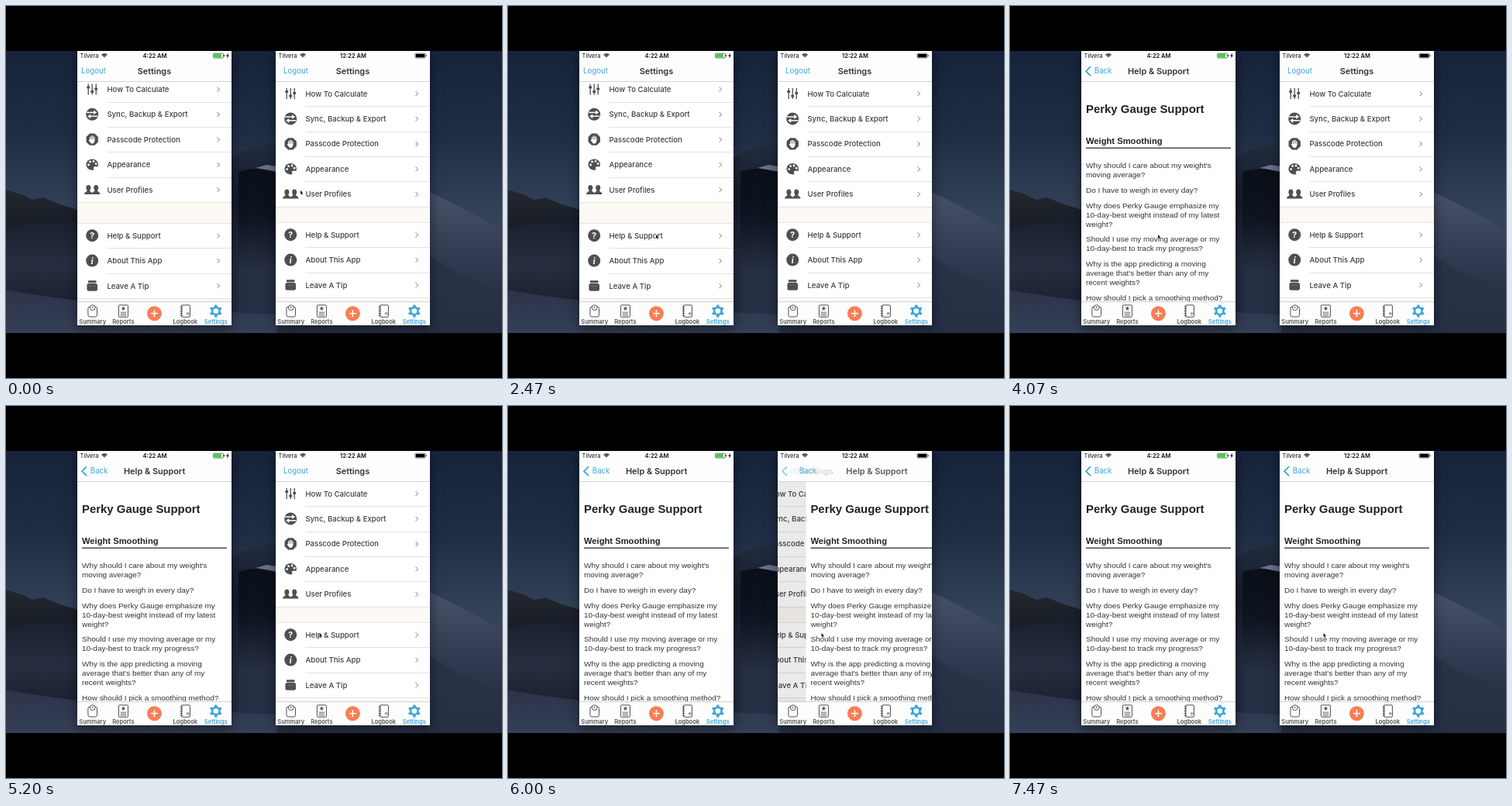
These frames come from a looping animation (640 by 480 pixels, 8 s). An HTML page with a canvas:

```html
<!DOCTYPE html>
<html lang="en">
<head>
<meta charset="utf-8">
<title>Settings navigation</title>
<style>
html, body { margin: 0; width: 100%; height: 100%; overflow: hidden; background: #000; }
canvas { display: block; }
</style>
</head>
<body>
<canvas id="stage" width="640" height="480"></canvas>
<script>
const c = document.getElementById('stage').getContext('2d');
const LOOP = 8000, W = 199, H = 354, NAV = 39.6, TAB = 323.3, ROW = 32.4;
const UI = 'Inter, sans-serif', WEB = '"Liberation Sans", Arial, sans-serif';
const BLUE = '#3fa5d8', INK = '#3c3c3c', ICON = '#4f4f4f';

const ROWS = ['How To Calculate', 'Sync, Backup & Export', 'Passcode Protection', 'Appearance',
  'User Profiles', 'Help & Support', 'About This App', 'Leave A Tip'];
const QUESTIONS = [
  ["Why should I care about my weight's", 'moving average?'],
  ['Do I have to weigh in every day?'],
  ['Why does Perky Gauge emphasize my', '10-day-best weight instead of my latest', 'weight?'],
  ['Should I use my moving average or my', '10-day-best to track my progress?'],
  ['Why is the app predicting a moving', "average that's better than any of my", 'recent weights?'],
  ['How should I pick a smoothing method?']
];
const PHONES = [
  { x: 92, time: '4:22 AM', logout: 5, first: 49.4, second: 222, push: 2676, load: 4070, charging: true },
  { x: 348, time: '12:22 AM', logout: 10, first: 55, second: 221, push: 5804, load: 0 }
];

// ---- helpers ----
function text(s, x, y, font, color = INK, align = 'left') {
  c.font = font;
  c.fillStyle = color;
  c.textAlign = align;
  c.fillText(s, x, y);
}
function rect(x, y, w, h, color) {
  c.fillStyle = color;
  c.fillRect(x, y, w, h);
}
function path(points, close) {
  c.beginPath();
  for (let i = 0; i < points.length; i += 2) c.lineTo(points[i], points[i + 1]);
  if (close) c.closePath();
}
function line(points, color, width = 1) {
  path(points);
  c.strokeStyle = color;
  c.lineWidth = width;
  c.stroke();
}
function poly(points, color) {
  path(points, true);
  c.fillStyle = color;
  c.fill();
}
function disc(x, y, r, color, ry = r) {
  c.beginPath();
  c.ellipse(x, y, r, ry, 0, 0, 7);
  c.fillStyle = color;
  c.fill();
}
function box(x, y, w, h, r, fill, stroke, width = 1) {
  c.beginPath();
  c.roundRect(x, y, w, h, r);
  if (fill) { c.fillStyle = fill; c.fill(); }
  if (stroke) { c.strokeStyle = stroke; c.lineWidth = width; c.stroke(); }
}
function at(x, y, draw) {
  c.save();
  c.translate(x, y);
  draw();
  c.restore();
}
function faded(alpha, draw) {
  c.save();
  c.globalAlpha *= alpha;
  draw();
  c.restore();
}
function shade(y0, y1, ...colors) {
  const g = c.createLinearGradient(0, y0, 0, y1);
  colors.forEach((col, i) => g.addColorStop(i / (colors.length - 1), col));
  return g;
}
function ring(n, r, turn = 0) {
  const p = [];
  for (let i = 0; i < n; i++) {
    const a = turn + i * 2 * Math.PI / n;
    p.push(r(i) * Math.cos(a), r(i) * Math.sin(a));
  }
  return p;
}

// ---- row icons, centred on 0,0 ----
function person(x) {
  disc(x, -2.4, 3, ICON, 3.7);
  c.beginPath();
  c.moveTo(x - 5.3, 6);
  c.bezierCurveTo(x - 5.3, 2.6, x - 1.6, 3.4, x - 1.5, 0);
  c.lineTo(x + 1.5, 0);
  c.bezierCurveTo(x + 1.6, 3.4, x + 5.3, 2.6, x + 5.3, 6);
  c.fill();
}
const ROW_ICONS = [
  () => [[-5, -2.5], [0, 3], [5, -0.5]].forEach(([x, y]) => {
    line([x, -7, x, 7], ICON, 1.3);
    box(x - 2, y - 1.5, 4, 3, 1, ICON);
  }),
  () => {
    disc(0, 0, 8, ICON);
    for (const s of [1, -1]) {
      line([-7 * s, -2.4 * s, 3 * s, -2.4 * s], '#fff', 1.5);
      poly([2 * s, -5.4 * s, 6 * s, -2.4 * s, 2 * s, 0.3 * s], '#fff');
    }
  },
  () => {
    poly(ring(8, () => 8.3, Math.PI / 8), ICON);
    [[-2.6, -3.2], [-0.9, -4.8], [0.9, -4.8], [2.6, -3.4]].forEach(([x, y]) =>
      line([x, y, x, 2], '#fff', 1.2));
    poly([-3.2, 0, 3.2, 0, 2.5, 4, 1, 5.3, -1.2, 5.3, -4.6, 1, -3.8, 0.4], '#fff');
  },
  () => {
    disc(0, 0, 7.8, ICON, 7.2);
    disc(4.6, 4.8, 3, '#fff', 2.4);
    [[-4.6, 0.4], [-2.6, -3.6], [1.8, -4.2], [4.9, -1]].forEach(([x, y]) => disc(x, y, 1.4, '#fff'));
  },
  () => { person(-4.8); person(5); },
  () => { disc(0, 0, 8, ICON); text('?', 0, 4, '700 11px ' + UI, '#fff', 'center'); },
  () => { disc(0, 0, 8, ICON); text('i', 0, 4, 'italic 700 12px "Liberation Serif", serif', '#fff', 'center'); },
  () => {
    box(-5.3, -6.8, 10.6, 3, 1, ICON);
    box(-6.8, -3, 13.6, 9.8, 2.5, ICON);
    line([-4.5, 0.2, 4.5, 0.2], '#777', 0.8);
  }
];

// ---- tab icons, centred on 0,0 ----
function gear() {
  c.beginPath();
  c.arc(0, 0, 4.7, 0, 7);
  c.strokeStyle = BLUE;
  c.lineWidth = 2.6;
  c.stroke();
  const tips = ring(6, () => 8, Math.PI / 6);
  for (let i = 0; i < 12; i += 2) line([tips[i] * 0.65, tips[i + 1] * 0.65, tips[i], tips[i + 1]], BLUE, 3.4);
}
const TABS = [
  [19.7, 'Summary', () => {
    box(-5.8, -5.6, 11.6, 13, 2.2, null, ICON, 1);
    disc(0, -4.4, 3.6, '#fff');
    c.beginPath();
    c.arc(0, -4.4, 3.4, 0, 7);
    c.stroke();
    line([0, -6, 0, -3.4], ICON, 1);
  }],
  [59.4, 'Reports', () => {
    box(-6, -7.7, 12, 15.4, 0.8, null, ICON, 1);
    poly(ring(10, i => i % 2 ? 1.3 : 3, -Math.PI / 2).map((v, i) => i % 2 ? v - 3.2 : v), ICON);
    for (const y of [1.6, 3.6, 5.6]) line([-3.8, y, 3.8, y], ICON, 0.8);
  }],
  [139.2, 'Logbook', () => {
    box(-4.8, -7.7, 11, 15.4, 1.2, null, ICON, 1);
    for (let y = -5.6; y < 7; y += 2.8) line([-6.5, y, -3.2, y], ICON, 1);
    box(2.2, 2.2, 2.4, 2.2, 0.5, null, ICON, 0.8);
  }],
  [178.8, 'Settings', gear]
];

// ---- scenery ----
// area under a curve from (x0,y0) to (x1,y1), bent towards (cx,cy)
function dune(x0, y0, cx, cy, x1, y1, color) {
  c.beginPath();
  c.moveTo(x0, y0);
  c.quadraticCurveTo(cx, cy, x1, y1);
  c.lineTo(x1, 422);
  c.lineTo(x0, 422);
  c.fillStyle = color;
  c.fill();
}
function landscape() {
  rect(0, 0, 640, 480, '#000');
  c.save();
  c.beginPath();
  c.rect(0, 58, 640, 364);
  c.clip();
  rect(0, 58, 640, 364, shade(58, 270, '#16233a', '#1f2d44', '#34435a'));
  poly([0, 237, 20, 243, 34, 250, 48, 247, 70, 256, 100, 265, 100, 330, 0, 330],
    shade(237, 300, '#23272f', '#151a24'));

  // far dune on the left, main dune with its shadow face, lit slope on the right
  dune(0, 288, 40, 272, 300, 262, shade(270, 400, '#171e2c', '#262e40', '#161c2a'));
  dune(270, 210, 310, 176, 352, 178, shade(176, 330, '#222d40', '#141b29', '#232c3f'));
  dune(300, 214, 325, 206, 352, 214, shade(206, 340, '#0a0f19', '#0e1420', '#262f43'));
  poly([322, 209, 336, 205, 350, 207, 350, 214, 334, 211], '#66738c');
  dune(350, 180, 500, 205, 640, 290, shade(230, 422, '#4a556c', '#394359', '#2a3348', '#273047'));
  dune(540, 318, 590, 352, 640, 368, shade(318, 422, '#2a3348', '#262f44'));

  // foreground
  dune(0, 366, 110, 388, 350, 398, shade(366, 422, '#2b3448', '#353f57'));
  c.restore();
}

// ---- phone screens ----
function list(phone) {
  const end = phone.first + 4.5 * ROW, last = phone.second + 3 * ROW;
  rect(0, 0, W, H, '#fff');
  rect(0, end, W, phone.second - end, '#fcf8f3');
  rect(0, last, W, 20, '#fcf8f3');
  for (const y of [end, phone.second, last]) rect(0, Math.round(y), W, 0.8, '#dedede');
  ROWS.forEach((label, i) => {
    const y = i < 5 ? phone.first + i * ROW : phone.second + (i - 4.5) * ROW;
    at(19.2, y, ROW_ICONS[i]);
    text(label, 38.4, y + 3.5, '500 9.6px ' + UI);
    line([180.5, y - 2.8, 183.6, y + 0.2, 180.5, y + 3.2], '#a4a4a4', 1.1);
    if (i !== 4 && i !== 7) rect(38.5, Math.round(y + ROW / 2), W, 0.8, '#dcdcdc');
  });
}
function helpPage(loaded) {
  rect(0, 0, W, H, '#fff');
  if (!loaded) return;
  text('Perky Gauge Support', 6, 80.2, 'bold 14.93px ' + WEB, '#222');
  text('Weight Smoothing', 6, 119.9, 'bold 11.2px ' + WEB, '#222');
  rect(6, 124.6, 187, 1.3, '#333');
  let y = 150.9;
  for (const lines of QUESTIONS) {
    lines.forEach((s, i) => text(s, 6, y + i * 11.94, '9.95px ' + WEB, '#333'));
    y += (lines.length - 1) * 11.94 + 19.9;
  }
}
function statusBar(phone) {
  text('Tilvera', 3.6, 8.7, '400 7.45px ' + UI, '#111');
  c.strokeStyle = '#111';
  c.lineWidth = 1.2;
  for (const r of [1, 2.9, 4.8]) {
    c.beginPath();
    c.arc(35, 8.6, r, -Math.PI * 0.76, -Math.PI * 0.24);
    c.stroke();
  }
  text(phone.time, 100, 8.8, '600 7.5px ' + UI, '#111', 'center');
  const x = phone.charging ? 175.5 : 180;
  box(x, 3.2, 13, 5.8, 1.2, '#fff', '#333', 0.7);
  box(x + 0.8, 4, phone.charging ? 9.6 : 11.4, 4.2, 0.6, phone.charging ? '#3fcf4c' : '#000');
  rect(x + 13.6, 5, 1, 2.2, '#333');
  if (phone.charging) poly([195, 2.6, 192, 6.6, 193.8, 6.6, 193, 9.8, 196, 5.6, 194.2, 5.6], '#111');
}
function navBar(phone, p) {
  const title = '600 10.9px ' + UI, item = '400 9.7px ' + UI, left = 1 - p;
  rect(0, 0, W, NAV, '#fdfdfd');
  rect(0, 39, W, 0.8, '#c9c9c9');
  statusBar(phone);
  faded(left, () => {
    text('Settings', 99.4 - 60 * p, 29.7, title, '#333', 'center');
    text('Logout', phone.logout, 29.4, item, BLUE);
  });
  if (!p) return;
  faded(p, () => {
    text('Help & Support', 99.6 + 155 * left, 29.7, title, '#333', 'center');
    text('Back', 16.8 + 60 * left, 29.4, item, BLUE);
  });
  faded(p ** 3, () => line([12, 20.2, 6, 26.2, 12, 32.2], BLUE, 1.7));
}
function tabBar() {
  rect(0, TAB, W, H - TAB, '#fdfdfd');
  rect(0, TAB, W, 0.8, '#c4c4c4');
  for (const [x, label, icon] of TABS) {
    at(x, 335.6, icon);
    text(label, x, 351.8, '600 7.5px ' + UI, label === 'Settings' ? BLUE : '#555', 'center');
  }
  disc(99.4, 338.7, 9.5, '#f97e55');
  line([95, 338.7, 103.8, 338.7], '#fff', 1.5);
  line([99.4, 334.3, 99.4, 343.1], '#fff', 1.5);
}
// critically damped push
function pushed(t) {
  if (t <= 0) return 0;
  const k = t * 0.0158;
  return k > 9.2 ? 1 : 1 - (1 + k) * Math.exp(-k);
}
function drawPhone(phone, t) {
  const p = pushed(t - phone.push), edge = W * (1 - p);
  c.save();
  c.beginPath();
  c.rect(0, 58, 640, 364);
  c.clip();
  c.shadowColor = 'rgba(0,0,0,.5)';
  c.shadowBlur = 14;
  c.shadowOffsetY = 4;
  rect(phone.x, 58, W, H, '#fff');
  c.restore();
  c.save();
  c.translate(phone.x, 58);
  c.beginPath();
  c.rect(0, 0, W, H);
  c.clip();
  if (p < 1) {
    at(-0.3 * W * p, 0, () => list(phone));
    rect(0, 0, W, H, `rgba(0,0,0,${0.1 * p})`);
  }
  if (p) at(edge, 0, () => helpPage(t >= phone.load));
  navBar(phone, p);
  tabBar();
  c.restore();
}

// ---- pointer ----
function glide(t, start, end, a, b, d, e) {
  let u = Math.min(1, Math.max(0, (t - start) / (end - start)));
  u *= u * (3 - 2 * u);
  const v = 1 - u;
  return [0, 1].map(i => v ** 3 * a[i] + 3 * v * v * u * b[i] + 3 * v * u * u * d[i] + u ** 3 * e[i]);
}
function pointer(t) {
  const [x, y] = t < 4600
    ? glide(t, 470, 1200, [380, 238], [330, 300], [130, 338], [191, 295])
    : glide(t, 4600, 5200, [191, 295], [260, 277], [340, 275], [404.5, 293]);
  at(x, y, () => {
    const arrow = [0, 0, 0, 4.9, 1.1, 4, 1.9, 5.7, 2.8, 5.3, 2, 3.6, 3.4, 3.5];
    path(arrow, true);
    c.strokeStyle = '#fff';
    c.lineWidth = 0.8;
    c.stroke();
    poly(arrow, '#111');
  });
}

function frame(now) {
  const t = now % LOOP;
  landscape();
  PHONES.forEach(phone => drawPhone(phone, t));
  pointer(t);
  requestAnimationFrame(() => frame(performance.now()));
}
frame(performance.now());
</script>
</body>
</html>
```
